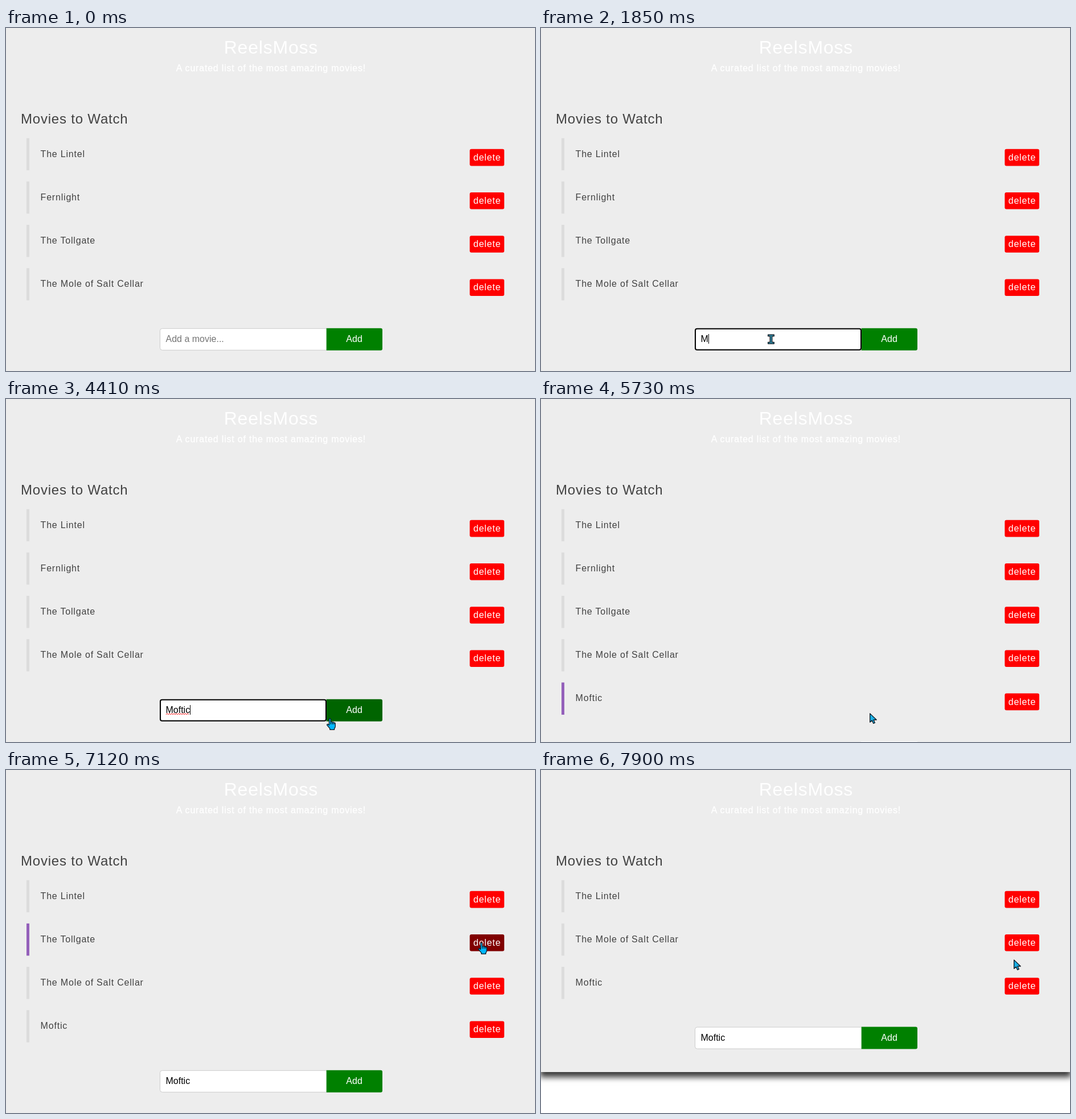
An HTML page that plays this animation: 929 by 603 pixels, repeating every 7.99 s.

```html
<!DOCTYPE html>
<html lang="en">
<head>
<meta charset="utf-8">
<title>Movie list</title>
<style>
  html, body { margin: 0; width: 100%; height: 100%; overflow: hidden; background: #fff; }
  #stage { position: relative; width: 100%; height: 100%; overflow: hidden; contain: strict; }
  #card { position: absolute; left: 0; top: 0; width: 100%; background: #ededed; box-shadow: 0 7px 10px 2px #3a3a3a; }
  svg { position: absolute; left: 0; top: 0; font: 16px "Liberation Sans", Arial, sans-serif; }
  .spaced { letter-spacing: .8px; }
  .white { fill: #fff; }
  .firm { stroke: #fff; stroke-width: .3; }
  .mid { text-anchor: middle; }
  .ink { fill: #424242; }
  .bar { fill: #dcdcdc; }
  .bar.on { fill: #9460ba; }
  .del { fill: #f00; }
  .del.on { fill: #800000; }
  .add { fill: #008000; }
  .add.on { fill: #006400; }
  .hint { fill: #757575; }
  .line { stroke: #101820; stroke-width: 1.3; stroke-linejoin: round; }
</style>
</head>
<body>
<div id="stage">
<div id="card"></div>
<svg width="929" height="603" viewBox="0 0 929 603">
  <g class="spaced">
    <text class="white mid" x="465.4" y="45" font-size="32">ReelsMoss</text>
    <text class="white firm mid" x="465.4" y="76">A curated list of the most amazing movies!</text>
    <text class="ink" x="26" y="168" font-size="24">Movies to Watch</text>
    <g id="rows"></g>
  </g>
  <g id="form">
    <path d="M563 .5H274.5a4 4 0 0 0-4 4v30a4 4 0 0 0 4 4H563" fill="#fff" stroke="#ccc"/>
    <path id="add" class="add" d="M562.7 0H658a3 3 0 0 1 3 3v33a3 3 0 0 1-3 3H562.7z"/>
    <rect id="ring" x="271" y="1" width="291" height="37" rx="3" fill="#fff" stroke="#000" stroke-width="2"/>
    <text class="white mid" x="611.6" y="24.2">Add</text>
    <text id="hint" class="hint" x="280.5" y="24.2">Add a movie...</text>
    <text id="value" x="280.5" y="24.2"></text>
    <path id="wave" fill="none" stroke="#f00"/>
    <rect id="caret" y="10.2" width="1" height="17"/>
  </g>
  <rect id="glow" x="562" y="602" width="99" height="1" fill="#fff"/>
  <g id="pointer">
    <path id="arrow" class="line" fill="#1ab0e6" d="M.7.9V16.2L4.3 13 6.8 18.4 9.4 17.2 7 12H12.2Z"/>
    <path id="beam" class="line" fill="#2f8aa5" d="M-5.3-7.9H5.3V-5.2H1.8V5.4H5.3V8.1H-5.3V5.4H-1.8V-5.2H-5.3Z"/>
    <g id="hand" class="line">
      <path fill="#00b8ff" d="M-1.6 12.5V1.8Q-1.6.6-.3.6T1.2 1.8V7Q3.6 5.6 4.3 7.4 6.3 6.4 7 8.2 9.3 7.5 9.3 9.8V14.6Q9.3 17 7.6 18.2V20.3H-.2V18.4L-5 12.7Q-5.8 11-4.4 10.6-3 10.2-1.6 12.5Z"/>
      <path fill="none" d="M1.4 7.4V11M4.4 7.8V11M7 8.6V11"/>
    </g>
  </g>
</svg>
</div>
<script>
const LOOP = 7990, PITCH = 76.2, ADDED = 4650, FOCUS = 910;
const REMOVED = [6580, 7670];
const KEYS = [1850, 2070, 2400, 2550, 2700, 3170];
const TITLE = 'Moftic';
const MOVIES = ['The Lintel', 'Fernlight', 'The Tollgate', 'The Mole of Salt Cellar'];

// Pointer moves: start, end, number of steps, waypoints
const MOVES = [
  [230, 820, 8, [[559, 594], [520, 588], [468, 580], [418, 568], [404, 547]]],
  [3720, 3870, 2, [[404, 546], [409, 547]]],
  [3870, 4480, 9, [[409, 547], [445, 553], [505, 564], [556, 563], [581, 559]]],
  [5350, 5730, 2, [[579, 556], [577, 552]]],
  [5730, 6430, 10, [[577, 552], [610, 520], [645, 482], [720, 420], [792, 372], [815, 330], [823, 306]]],
  [7040, 7120, 2, [[829, 304], [835, 303]]],
  [7750, 7900, 3, [[834, 312], [832, 324], [830, 333]]]
];

const $ = id => document.getElementById(id);
const show = (el, on) => el.style.display = on ? '' : 'none';
const within = (p, x, y, w, h) => !!p && p[0] >= x && p[0] < x + w && p[1] >= y && p[1] < y + h;

function make(parent, tag, attrs, text = '') {
  const el = document.createElementNS('http://www.w3.org/2000/svg', tag);
  for (const k in attrs) el.setAttribute(k, attrs[k]);
  el.textContent = text;
  return parent.appendChild(el);
}

const slots = Array.from({ length: 5 }, (_, i) => {
  const y = 193.6 + i * PITCH, btn = y + 19.2, height = 56.6;
  const g = make($('rows'), 'g', {});
  const slot = {
    g, y, btn, height,
    bar: make(g, 'rect', { class: 'bar', x: 36, y, width: 5, height }),
    name: make(g, 'text', { class: 'ink', x: 60.6, y: Math.round(y + 33) }),
    del: make(g, 'rect', { class: 'del', x: 814.4, y: btn, width: 60.6, height: 29.6, rx: 3 })
  };
  make(g, 'text', { class: 'white', x: 820.7, y: Math.round(btn + 20) }, 'delete');
  return slot;
});

function pointerAt(t) {
  const move = MOVES.filter(m => t >= m[0]).pop();
  if (!move) return null;
  const [start, end, steps, pts] = move;
  const k = Math.min(steps - 1, Math.floor((t - start) / (end - start) * (steps - 1) + 1e-6));
  const u = k / (steps - 1) * (pts.length - 1);
  const i = Math.min(pts.length - 2, Math.floor(u)), f = u - i;
  return [0, 1].map(a => pts[i][a] + (pts[i + 1][a] - pts[i][a]) * f);
}

function moviesAt(t) {
  const list = t >= ADDED ? [...MOVIES, TITLE] : [...MOVIES];
  for (const r of REMOVED) if (t >= r) list.splice(1, 1);
  return list;
}

function draw(t) {
  const p = pointerAt(t), list = moviesAt(t);
  const formY = 527.8 + (list.length - 4) * PITCH;
  let overButton = false;

  slots.forEach((s, i) => {
    const used = i < list.length;
    show(s.g, used);
    if (!used) return;
    const onDel = within(p, 815, s.btn, 60, 29);
    s.name.textContent = list[i];
    s.bar.classList.toggle('on', within(p, 36, s.y, 859, s.height));
    s.del.classList.toggle('on', onDel);
    overButton = overButton || onDel;
  });

  const overAdd = within(p, 563, formY, 98, 39);
  const overInput = within(p, 270, formY, 293, 39);
  overButton = overButton || overAdd;
  $('add').classList.toggle('on', overAdd);
  $('form').setAttribute('transform', `translate(0 ${formY})`);
  $('card').style.height = Math.round(formY + 79) + 'px';

  const focus = t >= FOCUS && t < ADDED;
  const typed = TITLE.slice(0, KEYS.filter(k => t >= k).length);
  $('value').textContent = typed;
  const width = typed ? $('value').getComputedTextLength() : 0;
  show($('hint'), !typed);
  show($('ring'), focus);

  const blinkOff = (t >= 1370 && t < KEYS[0]) || (t >= 3720 && t < 4180);
  show($('caret'), focus && !blinkOff);
  $('caret').setAttribute('x', Math.round(280.6 + width));
  show($('wave'), focus && t >= 4020);
  $('wave').setAttribute('d', 'M281 27' + 'l2-2l2 2'.repeat(Math.floor(width / 4)));
  show($('glow'), t >= ADDED && t < REMOVED[0]);

  show($('pointer'), p);
  if (p) $('pointer').setAttribute('transform', `translate(${Math.round(p[0])} ${Math.round(p[1])})`);
  show($('beam'), overInput);
  show($('hand'), overButton);
  show($('arrow'), !overInput && !overButton);
}

const begin = performance.now();
function tick() {
  draw((performance.now() - begin) % LOOP);
  requestAnimationFrame(tick);
}
tick();
</script>
</body>
</html>
```
